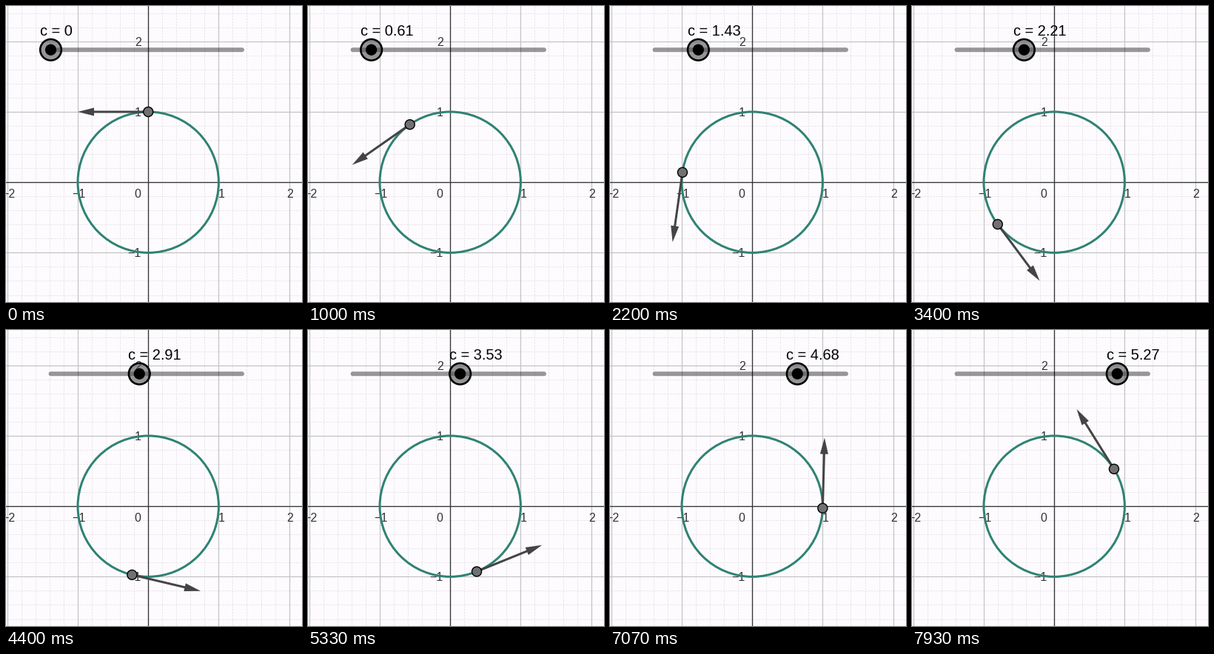
Recreate the animation shown at these times as a matplotlib script. Size 400 by 400 pixels, loop 8000 ms.

```python
import numpy as np
import matplotlib.pyplot as plt
from matplotlib.animation import FuncAnimation
from matplotlib.patches import Circle, Polygon

plt.rcParams["font.family"] = "Liberation Sans"

SIZE, DPI = 400, 100
PX = 72 / DPI                      # one pixel in points
FRAMES, LOOP = 400, 8000
OX, OY, UNIT = 192.2, 238.2, 95.2  # origin and unit length in pixels
TRACK_X0, TRACK_X1, TRACK_Y = 60.5, 319, 59.2
INK = "#444446"

# slider value at a few of the 120 steps; it runs almost evenly in between
KEY_STEPS = [0, 15, 33, 51, 66, 93, 119]
KEY_VALUES = [0, 0.61, 1.43, 2.21, 2.91, 4.1, 5.27]

fig = plt.figure(figsize=(SIZE / DPI, SIZE / DPI), dpi=DPI, facecolor="#fdfbfe")
ax = fig.add_axes([0, 0, 1, 1])
ax.set_xlim(0, SIZE)
ax.set_ylim(SIZE, 0)
ax.axis("off")


def line(xs, ys, color, width, z, **kw):
    return ax.plot(xs, ys, color=color, lw=width * PX, zorder=z, **kw)[0]


def text(x, y, s, size, color, z, ha="center"):
    return ax.text(x, y, s, fontsize=size * PX, color=color, zorder=z,
                   ha=ha, va="baseline")


def disc(x, y, r, z, **kw):
    return ax.add_patch(Circle((x, y), r, zorder=z, **kw))


def to_px(x, y):
    return np.array([OX + UNIT * x, OY - UNIT * y])


def mesh(ticks, **style):
    """Full-width lines at the given ticks in both directions."""
    xs, ys = [], []
    for k in ticks:
        x, y = to_px(k, k)
        xs += [x, x, np.nan, 0, SIZE, np.nan]
        ys += [0, SIZE, np.nan, y, y, np.nan]
    line(xs, ys, **style)


def draw_grid():
    mesh([k / 5 for k in range(-13, 14) if k % 5],
         color="#e8e6ea", width=1, z=1, dashes=(2.6, 1.4), snap=True)
    mesh(range(-2, 3), color="#c2c1c4", width=1.2, z=2, snap=True)
    mesh([0], color="#353537", width=1.3, z=3, snap=True)


def draw_numbers():
    for x, s in [(3, "\u22122"), (98.5, "\u22121"), (178.3, "0"),
                 (291.5, "1"), (384, "2")]:
        text(x, 259, s, 16, "#333335", 4)
    for y, s in [(53.5, "2"), (149, "1"), (338.6, "\u22121")]:
        text(182.8, y, s, 16, "#333335", 4, ha="right")


draw_grid()
draw_numbers()
disc(OX, OY, UNIT, 5, fill=False, ec="#2f8274", lw=3 * PX)
line([TRACK_X0, TRACK_X1], [TRACK_Y, TRACK_Y], (0, 0, 0, 0.4), 6, 6,
     solid_capstyle="round", snap=False)

shaft = line([], [], INK, 3, 7, solid_capstyle="butt", snap=False)
head = ax.add_patch(Polygon(np.zeros((3, 2)), fc=INK, ec="none", zorder=7))
point = disc(0, 0, 6.5, 8, fc="#717173", ec="black", lw=1.4 * PX)
knob = [
    disc(0, TRACK_Y, 14.3, 9, fc=(0.32, 0.32, 0.32, 0.6), ec="black", lw=2.6 * PX),
    disc(0, TRACK_Y, 7.6, 10, fc="black", ec="none"),
]
label = text(0, 39.6, "", 20, "black", 11, ha="left")


def update(i):
    step = (12 * i + 9) // 40      # 15 steps per second
    c = np.interp(step, KEY_STEPS, KEY_VALUES)
    start = to_px(-np.sin(c), np.cos(c))
    along = np.array([-np.cos(c), np.sin(c)])
    side = np.array([-along[1], along[0]])
    tip = start + UNIT * along
    base = tip - 22 * along

    shaft.set_data(*zip(start, base + along))
    head.set_xy([tip, base + 5.5 * side, base - 5.5 * side])
    point.center = start

    x = TRACK_X0 + (TRACK_X1 - TRACK_X0) * c / (2 * np.pi)
    for part in knob:
        part.center = (x, TRACK_Y)
    label.set_x(x - 14.8)
    label.set_text("c = " + f"{c:.2f}".rstrip("0").rstrip("."))
    return [shaft, head, point, *knob, label]


anim = FuncAnimation(fig, update, frames=FRAMES, interval=LOOP / FRAMES,
                     repeat=True, repeat_delay=0)
plt.show()
```
